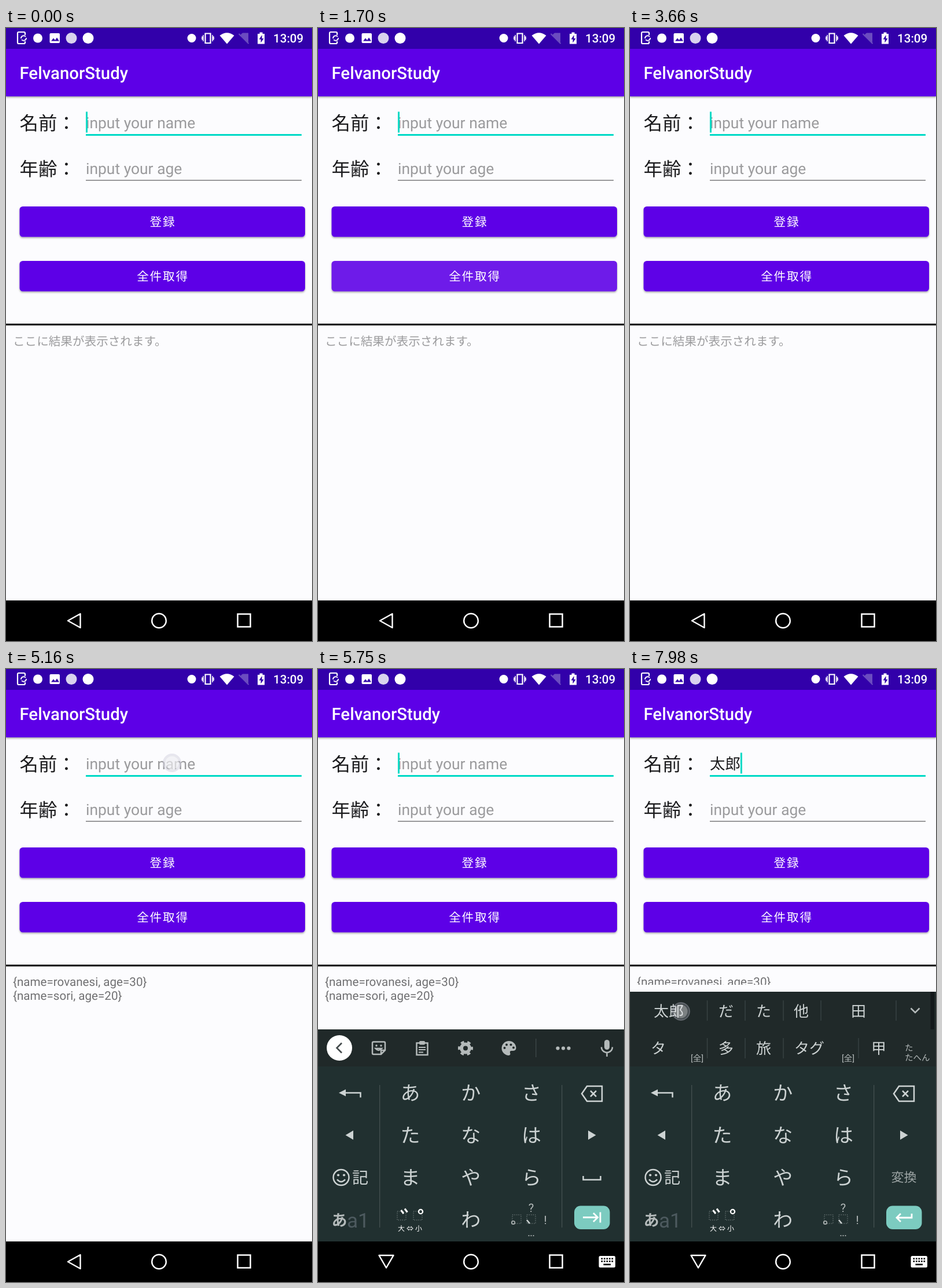
Recreate the animation shown at these times as an HTML page. Size 529 by 1058 pixels, loop 8000 ms.

```html
<!DOCTYPE html>
<html lang="ja">
<head>
<meta charset="utf-8">
<title>Form demo</title>
<style>
html, body { margin: 0; width: 100%; height: 100%; overflow: hidden; background: #fcfcfe; }
svg { display: block; width: 100vw; height: 100vh; }
text { font-family: Roboto, "Noto Sans CJK JP", "Noto Sans CJK", sans-serif; white-space: pre; }
</style>
</head>
<body>
<svg id="stage" viewBox="0 0 529 1058" text-rendering="geometricPrecision"></svg>
<script>
const TEAL = '#00dac6', KEY = '#cdd3d3', ICON = '#b4baba', PANEL = '#202929';

const text = (x, y, size, str, fill, extra = '') =>
  `<text x="${x}" y="${y}" font-size="${size}" fill="${fill}" ${extra}>${str}</text>`;
// Centred on (x, y), using the vertical middle of the CJK em box
const mid = (x, y, size, str, fill = KEY, extra = '') =>
  text(x, y + size * 0.38, size, str, fill, 'text-anchor="middle" ' + extra);
const rect = (x, y, w, h, fill, extra = '') =>
  `<rect x="${x}" y="${y}" width="${w}" height="${h}" fill="${fill}" ${extra}/>`;
const dot = (x, y, r, fill, extra = '') =>
  `<circle cx="${x}" cy="${y}" r="${r}" fill="${fill}" ${extra}/>`;
const line = (d, color, w = 2.5, extra = '') =>
  `<path d="${d}" fill="none" stroke="${color}" stroke-width="${w}" ${extra}/>`;
const shape = (d, fill, extra = '') => `<path d="${d}" fill="${fill}" ${extra}/>`;
const group = (id, body, extra = '') => `<g id="${id}" ${extra}>${body}</g>`;

const statusBar = rect(0, 0, 529, 36, '#3200aa') +
  line('M33 12V9q0-2-2-2H22q-2 0-2 2V25q0 2 2 2H31q2 0 2-2V23', '#fff', 2.2) +
  line('M26 18a4.500 4.500 0 0 1 8-3M35 17a4.500 4.500 0 0 1-8 3', '#fff', 1.8) +
  dot(55, 17.500, 8, '#fff') +
  rect(75.500, 9, 17.500, 17, '#fff', 'rx="2"') + shape('M78 22.500l4-5 3 3.500 3-4.500 4 6z', '#3200aa') +
  dot(113, 17.500, 9.500, '#d9d3ee') + dot(142, 17.500, 9.500, '#fff') + dot(321, 17.500, 7.500, '#fff') +
  line('M344.500 9.500h9v16.500h-9z', '#fff', 2.2) +
  line('M341 12v11M357 12v11M338.500 14.500l1.500 1.500-1.500 1.500 1.500 1.500-1.500 1.500M359.500 14.500l-1.500 1.500 1.500 1.500-1.500 1.500 1.500 1.500', '#fff', 1.5) +
  shape('M369.500 13q12.500-9.500 25 0L382 27.500z', '#fff') +
  shape('M404 13l5-4.500h10V25z', '#6b4cc0') + line('M402.500 10l17 17', '#6b4cc0', 2) +
  shape('M435 10h3.500V7.500h5V10H447V27.500H435z', '#fff') + shape('M442.500 12l-5 7.500h3v6l5-7.500h-3z', '#3200aa') +
  text(462, 25.300, 20.600, '13:09', '#fff', 'font-weight="500"');

const button = (y, label, inner = '') =>
  rect(23.500, y, 493.500, 52.500, '#5d00e7', 'rx="5.500" filter="url(#lift)"') + inner +
  mid(271, y + 26.500, 20.600, label, '#fff', 'letter-spacing="1.840"');

const form =
  rect(0, 36, 529, 82, '#5d00e7', 'filter="url(#lift)"') +
  text(23.500, 87.500, 29.400, 'FelvanorStudy', '#fff', 'font-weight="500"') +
  text(23.500, 176, 32.400, '名前：', '#1b1b1d') + text(23.500, 255, 32.400, '年齢：', '#1b1b1d') +
  text(138, 172.800, 26.450, 'input your name', '#9b9b9d', 'id="hint"') +
  text(138, 172.800, 26.450, '', '#1b1b1d', 'id="typed"') +
  text(138, 251.800, 26.450, 'input your age', '#9b9b9d') +
  rect(138, 175.500, 26.450, 1.5, '#1b1b1d', 'id="compose"') +
  rect(138, 183, 373, 3, TEAL) + rect(138, 262, 373, 1.6, '#828284') +
  rect(138, 144.500, 3, 36, TEAL, 'id="cursor"') +
  button(308, '登録') +
  button(402, '全件取得', group('ripple',
    rect(23.500, 402, 493.500, 52.500, '#fff', 'opacity=".125"') +
    dot(305, 428, 0, '#fff', 'id="wave" opacity=".025"'), 'clip-path="url(#press)"')) +
  rect(0, 510.300, 529, 3, '#000') +
  text(12, 547.600, 20.600, 'ここに結果が表示されます。', '#9b9b9d', 'id="empty"') +
  group('result',
    text(12, 547, 20.600, '{name=rovanesi, age=30}', '#707072') +
    text(12, 571.200, 20.600, '{name=sori, age=20}', '#707072'));

const toolbar = group('toolbar',
  rect(0, 622, 529, 64, PANEL) +
  dot(37, 654, 22, '#fff') + line('M41 645.500l-8.500 8.500 8.500 8.500', '#444b4c', 2.6) +
  line('M96 643.500h18q2 0 2 2V658l-7 7H96q-2 0-2-2V645.500q0-2 2-2zM116 658h-7v7', ICON) +
  dot(101, 650, 1.7, ICON) + dot(109, 650, 1.7, ICON) + line('M99.500 655q5 6 10.500 0z', ICON, 2.5) +
  line('M170.500 645.500h19v20.500h-19z', ICON) + rect(175, 642, 10, 6.500, ICON, 'rx="2"') +
  line('M174 653h12M174 657h12M174 661.500h8', ICON, 2) +
  dot(255, 654.500, 7, 'none', `stroke="${ICON}" stroke-width="6"`) +
  dot(255, 654.500, 11, 'none', `stroke="${ICON}" stroke-width="4" stroke-dasharray="5.760" stroke-dashoffset="2.880"`) +
  shape('M330 642a12.500 12.500 0 1 0 0 25q3.500-1 2-4.500-1-3.500 2.500-3.500h3q5-.5 5-5.500C342 646.500 336.500 642 330 642z', ICON) +
  [[322.500, 654], [326, 648.500], [333.500, 648.500], [338, 653.500]].map(([x, y]) => dot(x, y, 2, PANEL)).join('') +
  rect(376, 638, 1.5, 32, '#3b4546') +
  [414.500, 424, 433.500].map(x => dot(x, 654.500, 3.1, ICON)).join('') +
  rect(495, 640, 9, 17, ICON, 'rx="4.500"') + line('M490 652.500a9.500 9.500 0 0 0 19 0M499.500 662v7', ICON));

const rule = y => x => rect(x - .6, y, 1.3, 35, '#3b4546');
const words = (y, list) => list.map(([x, s]) => mid(x, y, 26, s)).join('');
const candidates = group('candidates',
  rect(0, 557, 529, 129, PANEL) + rect(519.500, 557, 6.500, 65, '#14191b') +
  [133.500, 199, 265, 330, 460].map(rule(572)).join('') +
  [133.500, 199, 265, 395].map(rule(637)).join('') +
  words(590, [[67, '太郎'], [166, 'だ'], [231, 'た'], [296, '他'], [395, '田']]) +
  words(654, [[49, 'タ'], [166, '多'], [231, '旅'], [310, 'タグ'], [430, '甲']]) +
  mid(116, 671, 14.500, '[全]', ICON) + mid(377, 671, 14.500, '[全]', ICON) +
  text(475, 659, 14.500, 'た', ICON) + text(475, 676, 14.500, 'たへん', ICON) +
  line('M485.500 585.500l7.500 7.500 7.500-7.500', ICON));

const rows = ['あかさ', 'たなは', 'まやら', ' わ '];
const kana = rows.map((row, j) =>
  [...row].map((c, i) => mid(159.500 + 104.700 * i, 731 + 73 * j, 34, c)).join('')).join('');
const box = (x, y) => line(`M${x} ${y}h15v15h-15z`, '#7d8787', 1, 'stroke-dasharray="1.500 2"');

const keyboard = rect(0, 686, 529, 302, '#213030') + toolbar + candidates +
  rect(106, 718, 1.3, 246, '#445050') + rect(421, 718, 1.3, 246, '#445050') + kana +
  shape('M36 731.500l12-6v12z', KEY) + line('M46 731.500h27.500v8', KEY) +
  shape('M47.500 804.500l13.500-8v16z', KEY) + shape('M480.500 804.500l-13.500-8v16z', KEY) +
  dot(40, 877.500, 13.500, 'none', `stroke="${KEY}" stroke-width="2.500"`) +
  dot(35, 873.500, 2.1, KEY) + dot(45, 873.500, 2.1, KEY) + line('M33 881q7 8 14 0', KEY) +
  mid(73, 877.500, 28, '記') +
  mid(37, 951, 27, 'あ', ICON, 'font-weight="700"') + text(50, 964, 35, 'a1', '#4d5a5f') +
  box(137, 936) + box(165, 936) +
  line('M143.500 934l4.500 6M150 931.500l4.500 6', '#fff', 3) + dot(177.500, 936.500, 3.6, 'none', 'stroke="#fff" stroke-width="2.200"') +
  mid(159, 965, 12, '大 ⇔ 小', '#fff') +
  box(336, 942) + box(361, 942) + dot(337.500, 955.500, 2.8, 'none', `stroke="${ICON}" stroke-width="1.500"`) +
  line('M361 951l5 6', KEY) + mid(368.500, 929, 20, '?', ICON) + mid(393, 950, 20, '!', ICON) +
  [364.500, 368.500, 372.500].map(x => dot(x, 978, 1.1, ICON)).join('') +
  line('M465 720h26v26h-26l-9-13zM471 728l10 10M481 728l-10 10', KEY) +
  rect(443, 926.500, 61.500, 40.500, '#7ccbc0', 'rx="11"') +
  group('idleKeys', line('M458.500 875v6.500h30V875', KEY) +
    line('M458 946.500h25M476 939l7.500 7.500-7.500 7.500M488 937.500v18', '#fff', 2.8)) +
  group('typingKeys', mid(473.500, 877, 22, '変換', '#9da5a5') +
    line('M487 940v7h-25M468 940l-7 7 7 7', '#fff', 2.8));

let pips = '';
for (let j = 0; j < 2; j++)
  for (let i = 0; i < 5; i++) pips += rect(489.500 + i * 4.500, 1016.500 + j * 4.500, 2.6, 2.6, '#000');

const nav = line('M107 1023l21.500-12v24z', '#fff', 2.4, 'id="back" stroke-linejoin="round"') +
  dot(264.500, 1023, 12.300, 'none', 'stroke="#fff" stroke-width="2.500"') +
  line('M400.500 1011.500h22v22h-22z', '#fff') +
  group('imeNav', line('M105.500 1012h25l-12.500 21.500z', '#fff', 2.4, 'stroke-linejoin="round"') +
    rect(485.500, 1013, 28.500, 20, '#fff', 'rx="2.500"') + pips + rect(493.500, 1026.500, 12.500, 2.6, '#000'));

const stage = document.getElementById('stage');
stage.innerHTML = `<defs>
  <filter id="lift" x="-5%" y="-20%" width="110%" height="150%"><feDropShadow dx="0" dy="1.800" stdDeviation="1.500" flood-opacity=".35"/></filter>
  <clipPath id="press"><rect x="23.500" y="402" width="493.500" height="52.500" rx="5.500"/></clipPath>
  <clipPath id="scroll"><rect x="0" y="513" width="529" height="32"/></clipPath></defs>` +
  rect(0, 0, 529, 1058, '#fcfcfe') + form + statusBar + rect(0, 988, 529, 70, '#000') +
  group('keyboard', keyboard) + nav +
  group('touch', dot(0, 0, 16, '#c4c4d2', 'opacity=".380"') +
    dot(0, 0, 15, 'none', 'stroke="#e6e2f4" stroke-opacity=".500"') + dot(0, 0, 11.500, '#fff', 'opacity=".480"'));

const el = {};
stage.querySelectorAll('[id]').forEach(e => el[e.id] = e);
const clamp = v => Math.max(0, Math.min(1, v));
const show = (id, on) => el[id].setAttribute('visibility', on ? 'inherit' : 'hidden');

const KEYS_IN = 5515, RESULT = 3790, TYPE = 6750, COMMIT = 7900;
const presses = [1240, 2120, 2960];
// x, y, down, start of fade, gone
const taps = [
  [321, 446, 1220, 1360, 1500], [318, 444, 2060, 2150, 2290], [318, 444, 2900, 3010, 3150],
  [287, 162, 5160, 5430, 5610], [159, 804, 6500, 6620, 6800], [88, 591, 7720, 7940, 8060]
];
const cursorOff = [[350, 850], [1820, 2400], [2860, 3320], [3820, 4320], [4820, 5320], [6400, 6750], [7250, 7720]];

function draw(t) {
  const between = (a, b) => t >= a && t < b;
  const typing = t >= TYPE, done = t >= COMMIT;

  show('cursor', !cursorOff.some(([a, b]) => between(a, b)));
  el.cursor.setAttribute('x', 138 + 26.450 * (done ? 2 : typing ? 1 : 0));
  el.typed.textContent = done ? '太郎' : typing ? 'た' : '';
  show('hint', !typing);
  show('compose', typing && !done);
  show('empty', t < RESULT);
  show('result', t >= RESULT);
  el.result.setAttribute('clip-path', typing ? 'url(#scroll)' : 'none');

  const age = t - (presses.filter(p => p <= t).pop() ?? -1e4);
  el.ripple.setAttribute('opacity', clamp(age / 80) * clamp((720 - age) / 350));
  el.wave.setAttribute('r', 136 * Math.min(age / 180, 2.2));

  const p = 1 - (1 - clamp((t - KEYS_IN) / 200)) ** 2;
  const open = t >= KEYS_IN;
  show('keyboard', open);
  el.keyboard.setAttribute('opacity', p);
  el.keyboard.setAttribute('transform', `translate(0 ${106 * (1 - p)})`);
  show('back', !open);
  show('imeNav', open);
  for (const id of ['toolbar', 'idleKeys']) show(id, !typing);
  for (const id of ['candidates', 'typingKeys']) show(id, typing);

  const tap = taps.find(([, , down, , gone]) => between(down, gone));
  show('touch', tap);
  if (tap) {
    const [x, y, , up, gone] = tap;
    el.touch.setAttribute('transform', `translate(${x} ${y})`);
    el.touch.setAttribute('opacity', clamp((gone - t) / (gone - up)));
  }
}

const start = performance.now();
function tick() {
  draw((performance.now() - start) % 8000);
  requestAnimationFrame(tick);
}
tick();
</script>
</body>
</html>
```
